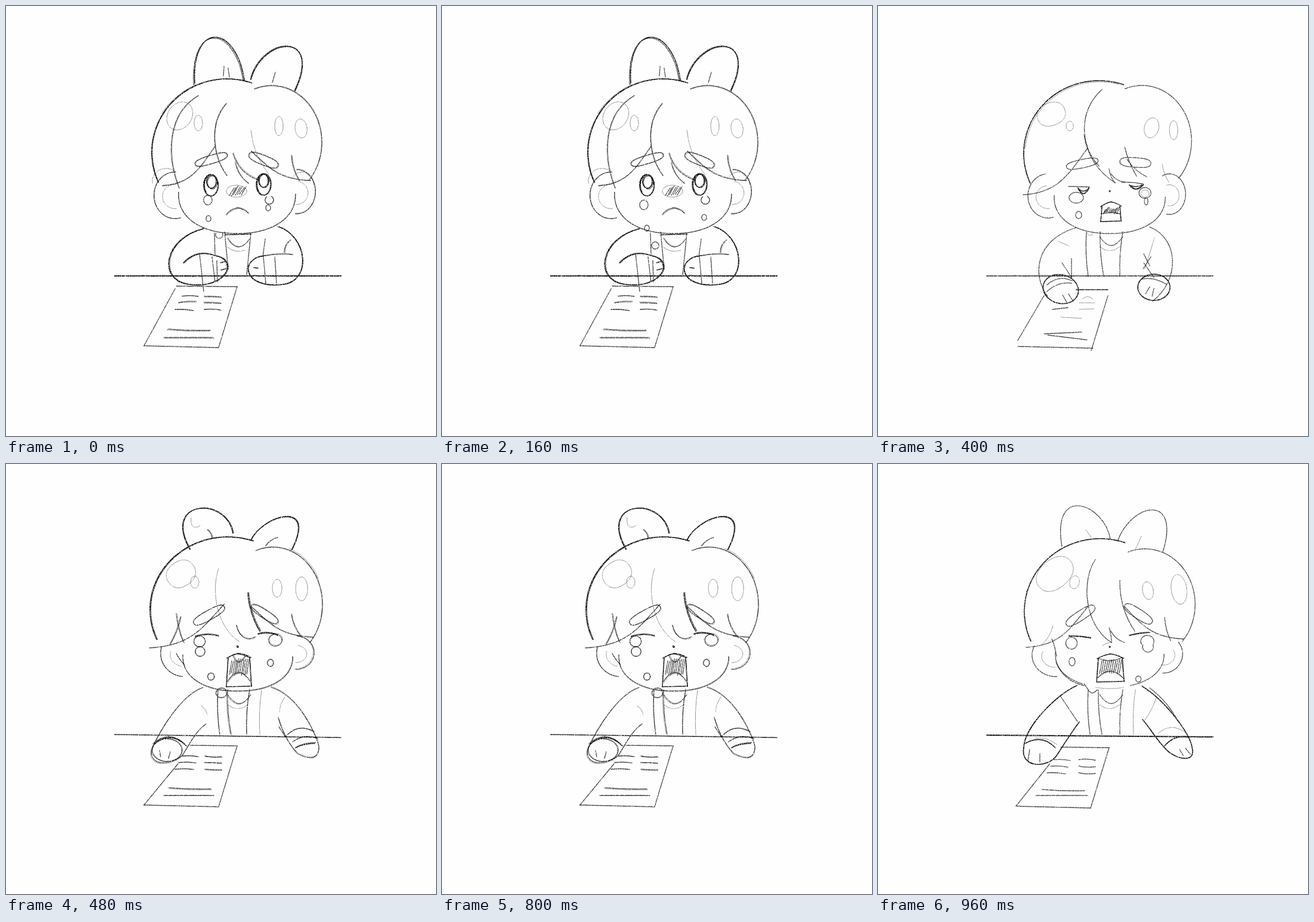
Recreate the animation shown at these times as an HTML page. Size 720 by 720 pixels, loop 1120 ms.

```html
<!DOCTYPE html>
<html lang="en">
<head>
<meta charset="utf-8">
<title>Crying at the desk</title>
<style>
html, body { margin: 0; width: 100%; height: 100%; overflow: hidden; background: #fefefe; }
svg { display: block; width: 100vw; height: 100vh; }
path { fill: none; stroke: #080808; stroke-linecap: round; stroke-linejoin: round; }
.t1 { stroke-width: 1; opacity: .45; }
.t2 { stroke-width: 1.3; opacity: .8; }
.t3 { stroke-width: 1.7; }
.t4 { stroke-width: 2.1; }
</style>
</head>
<body>
<svg id="stage" viewBox="0 0 720 720">
  <filter id="pencil" filterUnits="userSpaceOnUse" x="0" y="0" width="720" height="720" color-interpolation-filters="sRGB">
    <feTurbulence type="fractalNoise" baseFrequency=".75" numOctaves="2" seed="4" result="noise"/>
    <feColorMatrix in="noise" values="0 0 0 0 0  0 0 0 0 0  0 0 0 0 0  3 0 0 0 -.55" result="grain"/>
    <feDisplacementMap in="SourceGraphic" in2="noise" scale="1.4" xChannelSelector="R" yChannelSelector="G" result="rough"/>
    <feComposite in="rough" in2="grain" operator="in"/>
  </filter>
</svg>
<script>
const NS = "http://www.w3.org/2000/svg";
const stage = document.getElementById("stage");
const layers = {};

let seed = 7;
function jitter(size) {
  seed = (seed * 16807) % 2147483647;
  return (seed / 2147483647 - .5) * 2 * size;
}

function add(parent, tag, attrs) {
  const el = document.createElementNS(NS, tag);
  for (const key in attrs) el.setAttribute(key, attrs[key]);
  return parent.appendChild(el);
}

// A pen for one layer; loose layers get a fainter second pass over each curve
class Pen {
  constructor(name, loose = false) {
    this.loose = loose;
    this.g = layers[name] = add(stage, "g", { filter: "url(#pencil)", visibility: "hidden" });
  }
  stroke(tone, d, again = this.loose && tone > 1) {
    add(this.g, "path", { class: "t" + tone, d });
    if (again) add(this.g, "path", { class: "t" + (tone - 1), d, transform: `translate(${jitter(1.8)} ${jitter(1.8)})` });
  }
  // Angles in degrees, clockwise from the right; power above 2 squares the oval off
  arc(tone, cx, cy, rx, ry, from = 0, to = 360, turn = 0, power = 2) {
    const bow = v => Math.sign(v) * Math.abs(v) ** (2 / power);
    const tilt = turn * Math.PI / 180, pts = [];
    for (let i = 0; i <= 40; i++) {
      const a = (from + (to - from) * i / 40) * Math.PI / 180;
      const x = rx * bow(Math.cos(a)), y = ry * bow(Math.sin(a));
      pts.push([cx + x * Math.cos(tilt) - y * Math.sin(tilt), cy + x * Math.sin(tilt) + y * Math.cos(tilt)]);
    }
    this.stroke(tone, "M" + pts.join("L"));
  }
  oval(tone, cx, cy, rx, ry = rx, turn = 0) { this.arc(tone, cx, cy, rx, ry, 0, 360, turn); }
  // Bulge is measured at the middle, to the right of the direction
  bend(tone, x0, y0, x1, y1, bulge = 0) {
    const dx = x1 - x0, dy = y1 - y0, k = 2 * bulge / Math.hypot(dx, dy);
    this.stroke(tone, `M${x0} ${y0}Q${(x0 + x1) / 2 - dy * k} ${(y0 + y1) / 2 + dx * k} ${x1} ${y1}`);
  }
  cubic(tone, x, y, ...rest) { this.stroke(tone, `M${x} ${y}C${rest.join(" ")}`); }
  lines(tone, ...n) {
    for (let i = 0; i < n.length; i += 4) this.stroke(tone, `M${n[i]} ${n[i + 1]}L${n[i + 2]} ${n[i + 3]}`, false);
  }
  hatch(tone, x0, x1, y0, y1, count, slant) {
    for (let i = 0; i < count; i++) {
      const x = x0 + (x1 - x0) * i / (count - 1);
      this.lines(tone, x + slant, y0 + jitter(2), x, y1 + jitter(2));
    }
  }
}

const head = (p, x, y, rx, ry, x2, y2, rx2, ry2) => {
  p.arc(3, x, y, rx, ry, 156, 289);
  p.arc(2, x2, y2, rx2, ry2, 250, 402);
};

// Hair falling aside from the parting
const sweep = (p, x, y, x1, y1) => {
  const w = x1 - x, h = y1 - y;
  p.cubic(2, x, y, x + w * .28, y + h * .52, x + w * .44, y + h * .96, x1, y1);
};

const sideEar = (p, x, y, rx, ry, from, to) => {
  p.arc(2, x, y, rx, ry, from, to);
  p.arc(1, x, y + 2, rx * .6, ry * .52, from + 8, to);
};

const jaw = (p, x, y, rx, ry, from = 0, to = 182) => p.arc(2, x, y, rx, ry, from, to, 0, 2.2);
const brow = (p, x, y, len, thick, turn) => p.arc(2, x, y, len, thick, 0, 360, turn, 2.7);

const mouth = (p, x, y, top, base, height, tongue, lift) => {
  const l = x - top, r = x + top, end = y + height;
  p.lines(3, l, y, x - base, end, x - base, end, x + base, end - 1, x + base, end - 1, r, y);
  p.bend(3, l - 2, y + 1, x, y - 7, -1);
  p.bend(3, x, y - 7, r + 2, y, -1);
  p.bend(2, x - base + 2, y + tongue, x + base - 2, y + tongue, -lift);
  p.hatch(2, l + 2, r - 5, y + 4, y + tongue - lift * .8, 11, 4);
};

const jacket = (p, edges) => {
  const lean = [3, 6, -5, -3];
  edges.forEach((x, i) => p.bend(i < 3 ? 2 : 1, x, 378, x + lean[i], 453, 2));
  p.bend(2, 371, 386, 410, 386, 15);
  p.bend(1, 371, 403, 405, 403, 7);
};

// Sheet with three short rows in two columns and two long rows
const paper = (p, left, top, bottom, shift = 0, firstRow = 0) => {
  const y = top + 1;
  p.lines(2, left, top, 387, y, 387, y, 356, bottom, 356, bottom, 231, bottom - 3, 231, bottom - 3, 283 - (283 - left) * .2, left > 290 ? 502 : 473);
  for (let i = 0; i < 3; i++) {
    const row = y + 16 + i * 11 + shift;
    if (i >= firstRow) p.bend(2, 295 - i * 6, row, 322 - i * 4, row + jitter(2), -1);
    p.bend(2, 332 + shift, row, 360 + shift, row + 1, jitter(1.5));
  }
  p.bend(2, 271 + shift, 541 + shift, 342 + shift, 543 + shift, 1);
  p.bend(2, 264, 555, 347 + shift, 555);
};

const desk = (p, tone, y0, y1 = y0) => p.lines(tone, 182, y0, 561, y1);

function sad() {
  const p = new Pen("sad", true);
  p.cubic(3, 316, 130, 310, 25, 385, 30, 399, 124);
  p.cubic(3, 410, 123, 430, 50, 531, 43, 484, 142);
  p.lines(2, 364, 117, 365, 101, 374, 119, 372, 104, 446, 128, 451, 111);
  head(p, 370, 245, 126, 123, 445, 228, 84, 95);
  p.arc(1, 374, 248, 134, 128, 212, 245);
  p.cubic(2, 322, 150, 270, 180, 268, 250, 290, 305);
  p.cubic(2, 369, 163, 340, 195, 345, 250, 370, 284);
  sweep(p, 350, 235, 262, 301);
  sweep(p, 411, 243, 510, 292);
  p.bend(1, 410, 208, 440, 282, 6);
  p.bend(2, 380, 247, 424, 292, 8);
  p.bend(2, 384, 262, 406, 297, 4);
  p.bend(2, 478, 250, 491, 292, 3);
  p.oval(1, 291, 184, 20, 25, 35);
  p.oval(1, 322, 196, 7, 13);
  p.oval(1, 457, 201, 7, 16);
  p.oval(1, 494, 205, 10, 16, -8);
  brow(p, 344, 257, 28, 7, -17);
  brow(p, 431, 258, 26, 8, 22);
  for (const [x, y] of [[343, 300], [431, 299]]) {
    p.oval(3, x, y, 12, 18);
    p.oval(3, x + 1, y - 6, 8, 11);
    p.arc(4, x, y, 11, 17, 140, 230);
  }
  p.oval(1, 386, 310, 17, 10);
  p.hatch(2, 374, 394, 303, 317, 7, 8);
  p.bend(2, 369, 349, 387, 338, -2);
  p.bend(2, 387, 338, 406, 347, -2);
  p.arc(2, 441, 325, 7, 7, -60, 230);
  jaw(p, 387, 315, 98, 66);
  sideEar(p, 283, 317, 35, 39, 75, 272);
  sideEar(p, 487, 311, 31, 37, -90, 95);
  p.arc(1, 268, 293, 23, 21, 170, 310);
  p.arc(1, 496, 300, 20, 22, 220, 360);
  p.cubic(3, 330, 373, 262, 390, 255, 460, 305, 466, 370, 475, 390, 425, 350, 418);
  p.bend(3, 350, 418, 297, 430, 9);
  p.cubic(3, 455, 369, 505, 385, 512, 460, 465, 466, 395, 475, 390, 422, 433, 418);
  p.bend(2, 433, 418, 480, 416, -2);
  p.bend(2, 466, 413, 476, 392, -3);
  p.lines(2, 324, 414, 331, 478, 345, 420, 350, 462, 353, 426, 354, 462, 431, 420, 435, 465, 450, 420, 453, 464);
  p.lines(3, 359, 430, 366, 428, 360, 442, 368, 440, 415, 438, 422, 439, 415, 451, 424, 452);
  p.lines(2, 349, 380, 350, 417, 366, 378, 372, 440, 410, 380, 403, 450, 434, 390, 430, 420);
  p.lines(3, 367, 383, 410, 382);
  p.bend(2, 371, 389, 408, 390, 14);
  p.bend(1, 371, 404, 400, 409, 4);
  desk(p, 4, 452);
  paper(p, 285, 469, 572);
}

// Tears slide down while a drop leaves the chin
function drips() {
  for (let i = 0; i < 3; i++) {
    const p = new Pen("drip" + i);
    p.oval(2, 338, 325 + i * 4, 7, 8);
    p.oval(2, 339 + i * 2, 356 + i * 8, 4, 5);
    p.arc(2, 357, 383 + i * 9, 6, 6, i ? -90 : -20, i ? 270 : 205);
    p.oval(2, 439, 338 + i * 8, 4, 5);
  }
}

function gasp() {
  const p = new Pen("gasp");
  head(p, 370, 247, 126, 122, 442, 226, 83, 93);
  p.arc(1, 371, 249, 125, 122, 185, 285);
  p.cubic(2, 375, 140, 335, 175, 338, 235, 370, 268);
  sweep(p, 351, 238, 243, 316);
  p.bend(2, 345, 215, 397, 296, 11);
  p.bend(2, 387, 273, 397, 296, 2);
  p.bend(2, 390, 281, 413, 295, 3);
  p.bend(2, 413, 236, 433, 285, 2);
  p.bend(2, 417, 257, 450, 286, 3);
  p.bend(1, 476, 264, 487, 295, 2);
  p.arc(1, 290, 181, 24, 19, 0, 360, -20, 2.3);
  p.oval(1, 321, 201, 6, 8);
  p.oval(1, 458, 204, 12, 17, 15);
  p.oval(1, 495, 208, 7, 16);
  brow(p, 342, 264, 27, 7, -12);
  brow(p, 431, 262, 26, 8, 4);
  p.lines(2, 319, 302, 354, 303);
  p.bend(2, 408, 295, 444, 298, -1);
  p.bend(4, 335, 305, 353, 305, 9);
  p.bend(3, 335, 305, 353, 305, 5);
  p.bend(4, 421, 300, 444, 299, 7);
  p.bend(3, 421, 300, 444, 299, 3);
  p.oval(2, 332, 321, 12, 9);
  p.oval(2, 336, 350, 5, 6);
  p.oval(2, 447, 313, 10, 9);
  p.oval(1, 447, 314, 7, 6);
  p.oval(2, 449, 327, 3, 6);
  p.oval(3, 388, 310, .8);
  p.arc(1, 355, 379, 5, 5, 0, 180);
  mouth(p, 390, 335, 15, 17, 26, 13, 2);
  jaw(p, 388, 320, 93, 61);
  sideEar(p, 285, 318, 34, 37, 75, 262);
  sideEar(p, 488, 315, 27, 34, -115, 100);
  p.cubic(2, 332, 371, 262, 392, 258, 452, 284, 486);
  p.cubic(2, 455, 370, 505, 390, 505, 460, 460, 494);
  p.oval(3, 306, 474, 30, 24, 15);
  p.oval(3, 462, 471, 27, 22);
  p.bend(2, 283, 467, 325, 460, -7);
  p.bend(2, 283, 478, 324, 464, -5);
  p.bend(2, 442, 457, 483, 466, -4);
  p.lines(2, 309, 484, 316, 496, 319, 482, 327, 495, 448, 482, 455, 470, 459, 486, 462, 473);
  p.lines(2, 324, 423, 324, 455, 308, 430, 325, 456, 445, 415, 455, 435, 444, 440, 457, 420, 445, 430, 462, 455);
  p.lines(1, 302, 394, 320, 402, 463, 388, 447, 440);
  jacket(p, [349, 372, 410]);
  desk(p, 3, 452);
  p.lines(3, 332, 475, 385, 475);
  p.lines(2, 278, 485, 234, 560, 234, 570, 360, 573, 385, 485, 357, 577, 278, 549, 341, 546, 284, 551, 350, 559, 292, 508, 318, 505);
  p.bend(1, 343, 490, 360, 491, -4);
  p.lines(1, 337, 497, 363, 497, 337, 508, 362, 507, 306, 521, 341, 523);
}

function wail() {
  const p = new Pen("wail");
  p.cubic(2, 308, 138, 290, 33, 379, 66, 389, 126);
  p.cubic(2, 401, 129, 427, 62, 507, 51, 477, 147);
  p.lines(1, 348, 110, 357, 123, 431, 143, 441, 121);
  head(p, 372, 247, 127, 122, 447, 235, 84, 93);
  p.cubic(2, 364, 160, 340, 195, 345, 270, 391, 299);
  sweep(p, 352, 238, 248, 307);
  sweep(p, 412, 238, 512, 293);
  p.bend(1, 293, 271, 273, 304, -3);
  p.bend(2, 387, 274, 391, 299, -1);
  p.bend(2, 390, 280, 413, 299, 3);
  p.bend(2, 405, 195, 430, 280, 7);
  p.bend(2, 480, 257, 490, 296, 2);
  p.arc(1, 296, 184, 34, 24, 0, 360, -40, 2.2);
  p.oval(1, 329, 198, 8, 11, 15);
  p.oval(1, 452, 212, 9, 15, -10);
  p.oval(1, 504, 210, 13, 25, -8);
  brow(p, 339, 254, 28, 8, -33);
  brow(p, 436, 251, 27, 8, 33);
  p.bend(4, 320, 288, 356, 291, -1);
  p.bend(4, 421, 287, 455, 282, -1);
  p.oval(2, 324, 300, 9.5, 10);
  p.oval(2, 325, 331, 5, 7);
  p.arc(2, 451, 297, 11, 10, 150, 390);
  p.arc(2, 452, 306, 9, 9, -20, 200);
  p.oval(2, 436, 360, 4.5, 5);
  p.oval(3, 388, 306, .8);
  p.bend(1, 376, 304, 388, 299, -1);
  mouth(p, 389, 325, 20, 23, 40, 33, 11);
  p.bend(2, 369, 325, 408, 324, 5);
  jaw(p, 388, 318, 91, 56, 0, 70);
  jaw(p, 388, 318, 91, 56, 118, 182);
  p.arc(1, 388, 318, 91, 58, 75, 105);
  p.bend(2, 298, 332, 345, 371, 8);
  p.cubic(2, 345, 368, 353, 378, 356, 391, 367, 378);
  sideEar(p, 298, 320, 40, 36, 88, 205);
  sideEar(p, 478, 318, 32, 32, -38, 92);
  p.bend(2, 291, 293, 299, 322, -1);
  p.cubic(3, 333, 371, 300, 385, 245, 440, 244, 475, 238, 510, 285, 510, 300, 487, 312, 468, 325, 448, 337, 432);
  p.cubic(3, 442, 372, 480, 395, 522, 450, 526, 475, 532, 500, 505, 495, 488, 483, 470, 468, 458, 445, 443, 428);
  p.bend(3, 246, 468, 297, 475, -10);
  p.bend(3, 480, 472, 520, 457, -6);
  p.bend(1, 264, 459, 300, 470, -4);
  p.bend(1, 468, 452, 515, 450, -10);
  p.bend(2, 455, 375, 502, 430, -4);
  p.lines(2, 305, 388, 334, 431, 251, 497, 254, 478, 271, 499, 271, 485, 505, 478, 511, 488, 515, 476, 523, 486);
  p.bend(1, 467, 388, 446, 430, -2);
  jacket(p, [352, 369, 410, 431]);
  desk(p, 4, 454, 457);
  paper(p, 306, 474, 576, 4);
}

function howl() {
  const p = new Pen("howl", true);
  p.cubic(3, 308, 143, 260, 60, 369, 53, 380, 116);
  p.cubic(3, 410, 128, 430, 85, 522, 59, 479, 143);
  p.cubic(1, 310, 90, 308, 108, 318, 108, 325, 103);
  p.bend(2, 337, 110, 345, 124, -2);
  p.bend(2, 435, 137, 455, 123, -2);
  head(p, 371, 244, 130, 122, 447, 235, 83, 96);
  p.arc(1, 445, 232, 86, 96, 290, 335);
  p.cubic(1, 356, 175, 342, 215, 355, 275, 390, 297);
  sweep(p, 365, 235, 240, 308);
  sweep(p, 412, 240, 515, 290);
  p.bend(2, 293, 256, 275, 302, -2);
  p.bend(2, 285, 250, 297, 298, 2);
  p.cubic(2, 386, 270, 390, 290, 405, 297, 418, 289);
  p.bend(3, 405, 216, 425, 280, 4);
  p.bend(2, 478, 252, 495, 290, 3);
  p.arc(1, 293, 184, 25, 21, 0, 360, -35, 2.3);
  p.oval(1, 316, 198, 7, 10);
  p.oval(1, 454, 208, 8, 15);
  p.oval(1, 495, 209, 10, 20);
  brow(p, 340, 253, 29, 8, -29);
  brow(p, 433, 251, 26, 7, 33);
  p.bend(3, 317, 289, 356, 288, -3);
  p.bend(3, 422, 285, 455, 287, -3);
  p.oval(2, 324, 297, 9.5, 9);
  p.oval(2, 325, 314, 8);
  p.oval(2, 343, 356, 5.5, 6);
  p.oval(2, 451, 295, 11, 10);
  p.oval(2, 443, 333, 5, 6);
  p.oval(2, 361, 383, 9, 8);
  p.oval(3, 388, 306, 1);
  mouth(p, 390, 324, 18, 21, 49, 40, 15);
  p.bend(2, 380, 321, 400, 322, 10);
  jaw(p, 388, 322, 92, 58);
  sideEar(p, 299, 317, 40, 39, 95, 195);
  sideEar(p, 485, 316, 31, 28, -85, 90);
  p.bend(2, 285, 317, 298, 335, 1);
  p.cubic(2, 330, 374, 295, 385, 258, 445, 244, 478, 238, 508, 280, 504, 296, 487, 308, 468, 318, 447, 335, 435);
  p.cubic(2, 444, 374, 490, 388, 518, 450, 524, 473, 524, 498, 505, 494, 488, 485, 470, 465, 462, 445, 456, 425);
  p.oval(2, 270, 479, 25, 19);
  p.bend(3, 247, 470, 302, 472, -13);
  p.bend(2, 468, 457, 516, 448, -10);
  p.bend(2, 480, 465, 522, 460, -6);
  p.bend(3, 485, 475, 517, 468, -2);
  p.lines(2, 259, 490, 257, 480, 272, 493, 275, 482, 457, 440, 467, 456);
  p.bend(1, 327, 405, 337, 420, -2);
  p.bend(1, 467, 390, 458, 415, 2);
  jacket(p, [355, 371, 408, 428]);
  desk(p, 3, 453, 458);
  paper(p, 308, 471, 574, 1);
}

[sad, drips, gasp, wail, howl].forEach(draw => draw());

// Start time and the layers shown from then on
const LOOP = 1120;
const steps = [
  [0, "sad drip0"], [80, "sad drip1"], [160, "sad drip2"], [240, "sad drip0"],
  [400, "gasp"], [480, "howl"], [640, "wail"], [800, "howl"], [960, "wail"]
];
let shown = "";

function tick() {
  const t = performance.now() % LOOP;
  const now = steps.filter(([start]) => start <= t).pop()[1];
  if (now !== shown) {
    shown = now;
    const names = now.split(" ");
    for (const name in layers)
      layers[name].setAttribute("visibility", names.includes(name) ? "visible" : "hidden");
  }
  requestAnimationFrame(tick);
}
tick();
</script>
</body>
</html>
```
